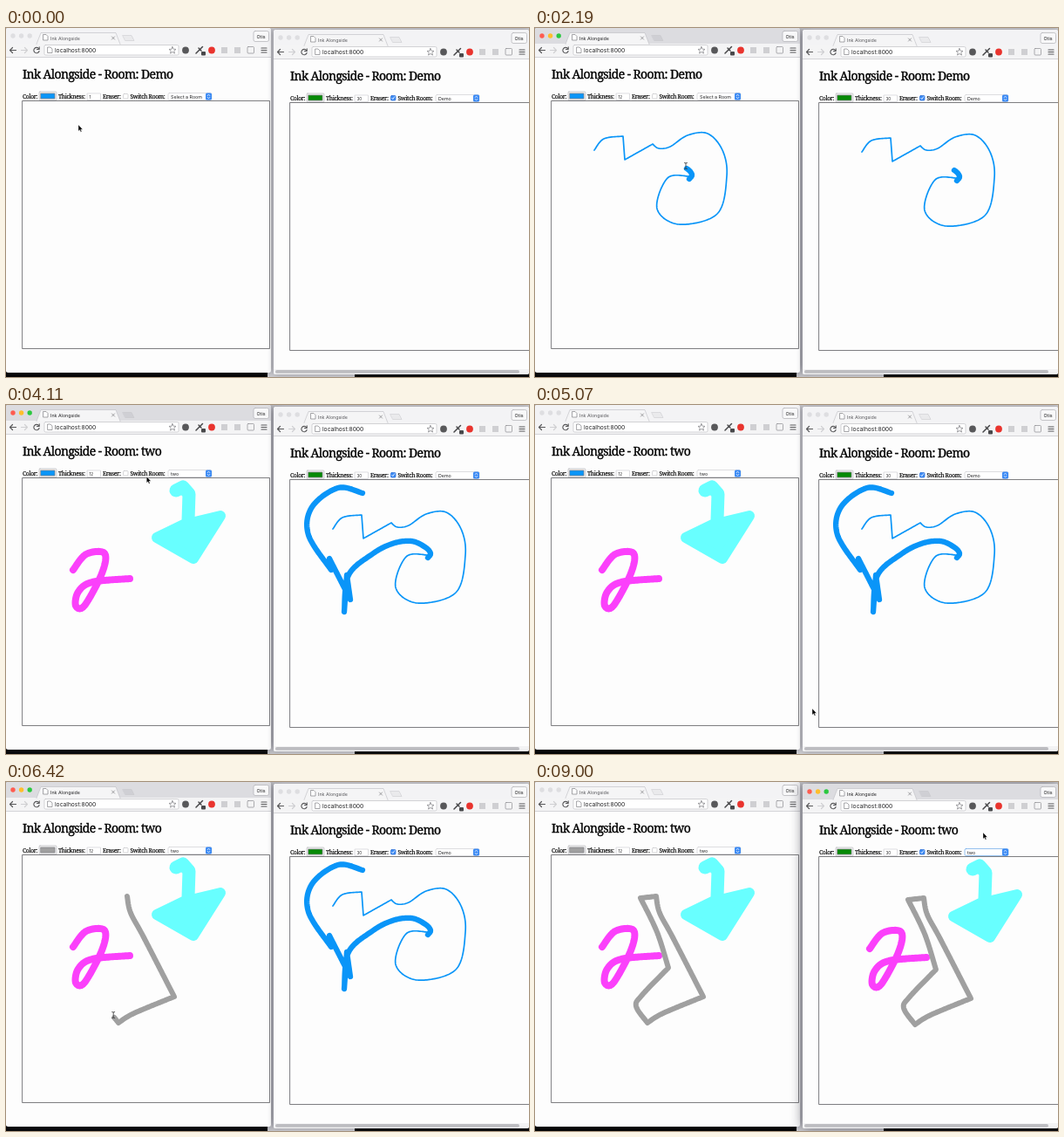
Animation of 600 by 400 pixels, one loop 9.03 s. Source, as an HTML page with a canvas:

```html
<!DOCTYPE html>
<html lang="en">
<head>
<meta charset="utf-8">
<title>Shared drawing rooms</title>
<style>
html, body { margin: 0; width: 100%; height: 100%; overflow: hidden; background: #fdfdfd; }
canvas { display: block; width: 600px; height: 400px; }
</style>
</head>
<body>
<canvas id="stage" width="600" height="400"></canvas>
<script>
const c = document.getElementById('stage').getContext('2d');
const LOOP = 9030, APP = 'Ink Alongside', USER = 'Otis';
const SANS = 'Inter, Roboto, sans-serif', SERIF = '"Noto Serif", serif';
const BLUE = '#0a95f8', GRAY = '#a0a0a0', GREEN = '#068a06', PINK = '#fb40fb', CYAN = '#68ffff';
const PAGE = '#fdfdfd', INK = '#202022', ICON = '#58585a', PALE = '#cfcfd2';
const ROWS = ['Select a Room', 'two', 'three', 'one', 'Demo'];

const clamp = u => Math.max(0, Math.min(1, u));
const ease = u => u * u * (3 - 2 * u);

// Smooth pieces (x,y pairs) meeting at sharp corners, sampled at an even spacing
function curve(...pieces) {
  const out = [];
  let last = [];
  for (const piece of pieces) {
    const v = [...last, ...piece], n = v.length / 2;
    const at = (i, d) => v[2 * Math.max(0, Math.min(n - 1, i)) + d];
    for (let i = 0; i < n - 1; i++) {
      const count = Math.ceil(Math.hypot(at(i + 1, 0) - at(i, 0), at(i + 1, 1) - at(i, 1)) / 1.5);
      for (let k = 0; k <= count; k++) {
        const u = k / count;
        out.push([0, 1].map(d => {
          const [p, q, r, s] = [-1, 0, 1, 2].map(j => at(i + j, d));
          return q + u / 2 * (r - p + u * (2 * p - 5 * q + 4 * r - s + u * (3 * (q - r) + s - p)));
        }));
      }
    }
    last = v.slice(-2);
  }
  return out;
}

const strokes = [
  { from: 390, to: 1450, width: 1.7, color: BLUE, room: 'Demo', pts: curve(
    [68,140, 79,127, 101,124], [103,151], [135,133],
    [142,138, 155,136, 175,123, 198,121, 215,140, 220,170, 209,213, 165,225, 140,207, 152,172, 177,170]) },
  { from: 2150, to: 3130, width: 6.3, color: BLUE, room: 'Demo', pts: curve(
    [177,173, 180,168, 174,161, 158,154, 136,157, 113,169, 86,193, 81,235],
    [84,193], [88,221], [64,174], [66,187], [40,147, 44,115, 74,93, 102,99]) },
  { from: 5600, to: 7120, width: 6, color: GRAY, room: 'two', pts: curve(
    [139,131, 143,150, 158,178, 193,246], [147,265, 129,276],
    [116,257, 123,244, 153,213], [140,172, 121,133], [139,131]) }
];
const two = curve([77,189, 92,171, 113,170, 110,193, 90,230, 80,230, 83,214, 99,203, 142,199]);

// Pointer rests (arrival time, x, y), joined with both ends of every stroke
const GLIDE = 300;
const stops = [
  [0, 83, 111], [1700, 101, 78], [3320, 212, 78], [3510, 212, 84], [4300, 48, 78],
  [4980, 318, 348], [7470, 514, 79], [8100, 514, 58],
  ...strokes.flatMap(s => [[s.from, ...s.pts[0]], [s.to, ...s.pts.at(-1)]])
].sort((a, b) => a[0] - b[0]);

const progress = (s, t) => clamp((t - s.from) / (s.to - s.from));

function pointer(t) {
  const s = strokes.find(s => t >= s.from && t < s.to);
  if (s) {
    const [x, y] = s.pts[Math.floor(progress(s, t) * (s.pts.length - 1))];
    return { x: x - 1, y: y - 3, beam: true };
  }
  const a = stops.findLast(k => k[0] <= t), b = stops.find(k => k[0] > t) || a;
  const u = ease(clamp(1 - (b[0] - t) / GLIDE));
  return { x: a[1] + (b[1] - a[1]) * u, y: a[2] + (b[2] - a[2]) * u };
}

function paint(fill, line, width = 0.7) {
  if (fill) { c.fillStyle = fill; c.fill(); }
  if (line) { c.strokeStyle = line; c.lineWidth = width; c.stroke(); }
}
function rect(x, y, w, h, fill, line, r = 0) {
  c.beginPath();
  c.roundRect(x, y, w, h, r);
  paint(fill, line);
}
function dot(x, y, r, fill) {
  c.beginPath();
  c.arc(x, y, r, 0, 7);
  paint(fill);
}
function shape(d, x, y, fill, line, width = 1) {
  c.save();
  c.translate(x, y);
  const p = new Path2D(d);
  if (fill) { c.fillStyle = fill; c.fill(p); }
  if (line) { c.strokeStyle = line; c.lineWidth = width; c.stroke(p); }
  c.restore();
}
function text(str, x, y, size, color = INK) {
  c.font = `${size}px ${SANS}`;
  c.letterSpacing = '0px';
  c.fillStyle = color;
  c.fillText(str, x, y);
}
function serif(str, x, y, size) {
  c.font = `${size}px ${SERIF}`;
  c.letterSpacing = -size * 0.044 + 'px';
  c.fillStyle = c.strokeStyle = '#000';
  c.lineWidth = size * 0.025;
  c.fillText(str, x, y);
  c.strokeText(str, x, y);
}
function trace(pts, width, color, u = 1) {
  c.beginPath();
  pts.slice(0, 1 + Math.floor(u * (pts.length - 1))).forEach(p => c.lineTo(...p));
  paint(null, color, width);
}

function drawing(room, t) {
  if (room === 'two') {
    trace(two, 8, PINK);
    shape('M195 98L203 94L210 102L209 132', 0, 0, null, CYAN, 15);
    shape('M173 152L204 137L246 127L215 176Z', 0, 0, CYAN, CYAN, 12);
  }
  for (const s of strokes)
    if (s.room === room && t >= s.from) trace(s.pts, s.width, s.color, progress(s, t));
}

function sheet(x, y) {
  shape('M0 0H3L5 2V6.5H0Z', x, y, '#fff', '#808084', 0.7);
}

function chrome(w, active) {
  rect(0, 0, w, 18, active ? '#dcdce0' : '#f3f3f5');
  ['#ff5c50', '#ffbe2c', '#2bc840'].forEach((k, i) =>
    dot(8 + i * 9.6, 9, 2.7, active ? k : '#dedee1'));
  rect(0, 18, w, 15.5, '#f4f4f5');
  shape('M35 18.5L40 5.5H126L131 18.5', 0, 0, '#f5f5f6', '#bdbdc2', 0.6);
  shape('M134 8.5H144L147 14.5H137Z', 0, 0, active ? '#cfcfd4' : '#eaeaec', '#c4c4c8', 0.5);
  sheet(43, 7.5);
  text(APP, 51, 13.5, 5.3, active ? INK : '#58585c');
  shape('M-1.6 -1.6L1.6 1.6M1.6 -1.6L-1.6 1.6', 123, 11.5, null, '#7a7a7e', 0.7);
  rect(w - 20, 3.5, 17.5, 12, '#f8f8f9', '#b0b0b5', 2);
  text(USER, w - 16.5, 11.8, 5.4);

  shape('M3.5 0H-3.5M-.5 -3L-3.5 0L-.5 3', 8, 25.5, null, ICON, 1.2);
  shape('M-3.5 0H3.5M.5 -3L3.5 0L.5 3', 21, 25.5, null, PALE, 1.2);
  shape('M2.5 -2A3.2 3.2 0 1 0 3.1 1M3.2 -3.7V-1H.5', 35, 25.5, null, ICON, 1.1);
  rect(44, 19.5, w - 150, 11.5, '#fff', '#c2c2c6', 1.5);
  sheet(48, 22);
  text('localhost:8000', 56, 28, 6.7);
  shape('M0 -4L1.2 -1.3L4 -1.1L1.8 .8L2.5 3.6L0 2L-2.5 3.6L-1.8 .8L-4 -1.1L-1.2 -1.3Z',
    w - 113, 25.5, null, '#7a7a7e', 0.7);
  dot(w - 98, 25.5, 3.9, ICON);
  shape('M-4 4L1 -1M-1 -2L2 1M1 -1L3.5 -3.5', w - 82, 25, null, '#48484a', 1.5);
  rect(w - 80, 27, 5, 4.5, '#48484a', null, 1);
  dot(w - 68, 25.5, 3.9, '#e9342e');
  rect(w - 57, 22, 7, 7, PALE);
  rect(w - 42, 22, 7, 7, PALE);
  rect(w - 27, 21.5, 7.5, 7.5, '#f4f4f5', '#8c8c90', 1);
  shape('M-3 -2.5H3M-3 0H3M-3 2.5H3', w - 8, 25.5, null, ICON, 1.2);
  rect(0, 33, w, 0.7, '#c9c9cd');
}

function popup(sel, y) {
  const top = 78 - sel * 7.5, hover = Math.round((y - top) / 7.5);
  c.save();
  c.shadowColor = 'rgba(0,0,0,.35)';
  c.shadowBlur = 5;
  c.shadowOffsetY = 2;
  rect(180.5, top - 6, 56.5, 42.5, '#f3f3f4', null, 2);
  c.restore();
  ROWS.forEach((name, i) => {
    const mid = top + i * 7.5, color = i === hover ? '#fff' : INK;
    if (i === hover) rect(180.5, mid - 3.8, 56.5, 7.6, '#2f82f8');
    if (i === sel) shape('M-1.8 0L-.5 1.8L2 -2.2', 185.5, mid, null, color, 0.9);
    text(name, 190.5, mid + 2, 5.3, color);
  });
}

function form(s) {
  serif(`${APP} - Room: ${s.room}`, 19, 58, 14);
  serif('Color:', 19, 80.7, 6.7);
  rect(38, 73, 20, 10, '#f0f0f1', '#bcbcc0', 1);
  rect(40, 75, 16, 6, s.color, '#808084');
  serif('Thickness:', 60, 80.7, 6.7);
  rect(93.5, 75, 15, 7.5, '#fff', '#d0d0d4');
  text(s.size, 95.5, 80.6, 4.6);
  serif('Eraser:', 111, 80.7, 6.7);
  rect(134.5, 75.5, 5.5, 5.5, s.eraser ? '#3b8af4' : '#fff', s.eraser ? '#2c6fd6' : '#c4c4c8', 1);
  if (s.eraser) shape('M-1.5 0L-.4 1.3L1.6 -1.6', 137.2, 78.3, null, '#fff', 0.8);
  serif('Switch Room:', 142.5, 80.7, 6.7);
  rect(186, 74.5, 50, 8, '#fff', s.focus ? '#67a7e8' : '#d0d0d4', 1.5);
  text(s.choice, 189, 80.5, 5.3);
  rect(229, 74.5, 7, 8, '#3b8af4', null, 1.5);
  shape('M-1.4 -.8L0 -2.4L1.4 -.8M-1.4 .8L0 2.4L1.4 .8', 232.5, 78.5, null, '#fff', 0.7);
}

function browser(x, y, w, h, s, t) {
  c.save();
  c.translate(x, y);
  c.save();
  c.shadowColor = `rgba(30,30,45,${s.active ? 0.6 : 0.35})`;
  c.shadowBlur = s.active ? 14 : 7;
  rect(0, 0, w, h, PAGE, null, 2.5);
  c.restore();
  c.beginPath();
  c.roundRect(0, 0, w, h, 2.5);
  c.clip();
  chrome(w, s.active);
  form(s);

  c.save();
  c.beginPath();
  c.rect(19, 84, 283, 283);
  c.clip();
  drawing(s.room, t);
  c.restore();
  rect(19, 83.5, 283.5, 284, null, '#48484c');
  if (s.bar) {
    rect(0, h - 6, w, 6, '#f3f3f4');
    rect(2, h - 5, 280, 3.8, '#bdbdc1', null, 1.9);
  }
  c.restore();
}

function frame(t) {
  const p = pointer(t), moved = t >= 3720, joined = t >= 8400;
  c.lineCap = c.lineJoin = 'round';
  rect(0, 0, 600, 400, '#d0d0d4');
  rect(0, 394, 300, 6, '#050505');
  rect(400, 394, 200, 6, '#050505');

  browser(0, 0, 304, 395, {
    active: t >= 360 && t < 4450 || t >= 5540 && t < 7470,
    room: moved ? 'two' : 'Demo', choice: moved ? 'two' : ROWS[0],
    color: t < 5260 ? BLUE : GRAY, size: t < 1800 ? '1' : '12'
  }, t);
  browser(307, 2, 293, 395, {
    active: t >= 7470, room: joined ? 'two' : 'Demo', choice: joined ? 'two' : 'Demo',
    color: GREEN, size: '30', eraser: true, focus: joined, bar: true
  }, t);

  if (t >= 3360 && !moved) popup(0, p.y);
  if (t >= 7530 && !joined) {
    c.save();
    c.translate(307, 2);
    popup(4, p.y - 2);
    c.restore();
  }
  if (p.beam) shape('M-1.5 -3.5L0 -3L1.5 -3.5M0 -3V3M-1.5 3.5L0 3L1.5 3.5', p.x, p.y, null, '#363638', 0.8);
  else shape('M0 0V7.2L1.6 5.7L2.7 8.2L3.9 7.7L2.8 5.2H5Z', p.x, p.y, '#000', '#fff', 0.4);
}

const start = performance.now();
function tick() {
  frame((performance.now() - start) % LOOP);
  requestAnimationFrame(tick);
}
tick();
</script>
</body>
</html>
```
